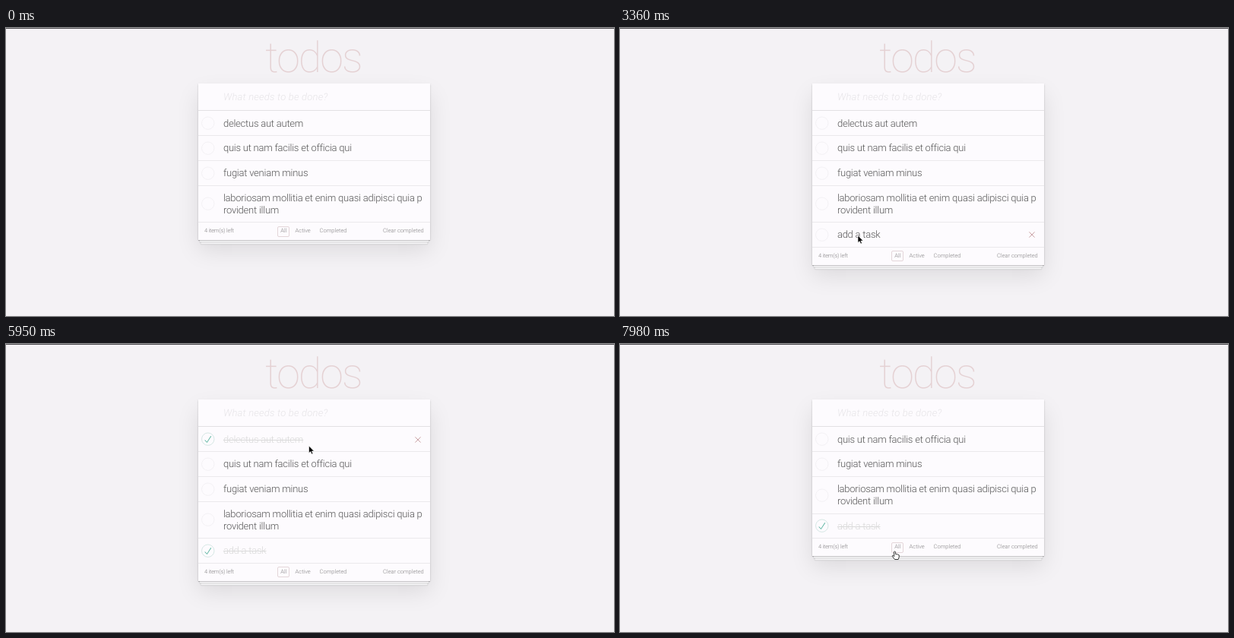
An HTML page that plays this animation: 800 px wide and 379 px high, repeating every 8 s.

```html
<!DOCTYPE html>
<html lang="en">
<head>
<meta charset="utf-8">
<title>todos</title>
<style>
  html, body { margin: 0; width: 100%; height: 100%; overflow: hidden; }
  body {
    position: relative; background: #f4f2f5;
    font: 300 13px/16px Roboto, "Liberation Sans", sans-serif;
    letter-spacing: -.23px; text-rendering: geometricPrecision;
  }
  #edge { position: absolute; top: 0; left: 0; right: 0; height: 1px; background: #504e52; }
  h1 {
    position: absolute; left: 341px; top: 6px; margin: 0;
    font-size: 55.6px; font-weight: 100; line-height: 66px; letter-spacing: -1.9px;
    color: rgba(160, 60, 60, .18);
  }
  #card {
    position: absolute; left: 252.6px; top: 72.6px; width: 305.5px; background: #fdfbfe;
    box-shadow: 0 1.1px 2.2px rgba(0, 0, 0, .2), 0 14px 28px rgba(0, 0, 0, .1);
  }
  #entry, .row { position: relative; box-sizing: border-box; padding-left: 33.3px; white-space: pre; }
  #entry { height: 36.9px; padding-top: 11px; border-bottom: 1px solid #e2e0e3; color: #575557; }
  #entry.empty { font-style: italic; letter-spacing: .22px; color: #e6e4e7; }
  #caret { display: inline-block; width: 1px; height: 15px; margin-right: -1px; vertical-align: -3px; background: #4d4d4d; }
  .row { padding-top: 9.2px; border-bottom: 1px solid #ebe9ec; }
  svg { position: absolute; overflow: visible; fill: none; }
  .toggle { left: 0; top: calc(50% - 11.1px); width: 22.2px; height: 22.2px; }
  .toggle circle { stroke: #e9e7ea; stroke-width: 3; }
  .toggle path { fill: #55b29d; visibility: hidden; }
  .done .toggle circle { stroke: #add2ca; }
  .done .toggle path { visibility: visible; }
  .done span { text-decoration: line-through; }
  .remove { right: 12.5px; top: calc(50% - 3.6px); width: 8px; height: 8px; stroke-width: .9; }
  footer {
    position: relative; height: 23px; font-size: 7.5px; line-height: 22.6px; letter-spacing: 0; color: #828082;
    box-shadow: 0 .6px .6px rgba(0, 0, 0, .2),
      0 4.4px 0 -1.7px #f6f5f7, 0 5px .6px -1.7px rgba(0, 0, 0, .25),
      0 8.9px 0 -3.3px #f6f5f7, 0 9.4px 1px -3.3px rgba(0, 0, 0, .25);
  }
  footer * { position: absolute; top: 0; white-space: nowrap; }
  footer i { left: 104.9px; top: 4.5px; width: 14px; height: 12px; border: 1px solid #e4d6d9; border-radius: 2px; }
  #cursor { left: 0; top: 0; width: 1px; height: 1px; }
</style>
</head>
<body>
<div id="edge"></div>
<h1>todos</h1>
<div id="card">
  <div id="entry"></div>
  <div id="list"></div>
  <footer>
    <span style="left:8.3px;letter-spacing:-.2px">4 item(s) left</span>
    <i></i>
    <span style="left:108.7px">All</span>
    <span style="left:128px">Active</span>
    <span style="left:160px">Completed</span>
    <span style="right:8.3px">Clear completed</span>
  </footer>
</div>
<svg id="cursor">
  <path id="arrow" fill="#000" stroke="#fff" stroke-width=".6" d="M0 0V9.6L2.2 7.6 3.8 11 5.4 10.3 3.9 7.1H6.9Z"/>
  <path id="beam" stroke="#333" stroke-width=".9" d="M-2.5-7.5Q0-7.5 0-6V6Q0 7.5-2.5 7.5M2.5-7.5Q0-7.5 0-6V6Q0 7.5 2.5 7.5"/>
  <path id="hand" fill="#fff" stroke="#222" stroke-width=".9" stroke-linejoin="round"
    d="M-1 1Q0-.2 1 1L1.2 4.2 2.8 4.1 4.3 4.6 5.8 5.4 5.6 8.4 4.6 11H0L-3.4 6.6Q-3.2 5.4-1.9 6.1L-.8 7.1Z"/>
</svg>
<script>
const LOOP = 8000, TICK = 70;
const FOCUS = 350, TYPE = 840, KEY = 140, SUBMIT = 2660, BLUR = 3990;
const LINE = 16, LIST_TOP = 109.5;
const $ = id => document.getElementById(id);
const clamp = k => Math.min(1, Math.max(0, k));
const smooth = k => k * k * (3 - 2 * k);

const newTask = 'add a task';
const tasks = [
  { text: 'delectus aut autem', doneAt: 5530, until: 7210 },
  { text: 'quis ut nam facilis et officia qui' },
  { text: 'fugiat veniam minus' },
  { text: 'laboriosam mollitia et enim quasi adipisci quia p\nrovident illum' },
  { text: newTask, from: SUBMIT, doneAt: 4130 },
].map(task => ({ from: 0, until: Infinity, doneAt: Infinity, ...task }));

for (const task of tasks) {
  const el = task.el = document.createElement('div');
  task.height = 16.7 + LINE * task.text.split('\n').length;
  el.className = 'row';
  el.style.height = task.height + 'px';
  el.innerHTML = '<svg class="toggle" viewBox="-10 -18 100 135"><circle cx="50" cy="50" r="50"/>'
    + '<path d="M72 25L42 71 27 56l-4 4 20 20 34-52z"/></svg>'
    + `<span>${task.text}</span>`
    + '<svg class="remove"><path d="M.4.4 7.6 7.6M7.6.4.4 7.6"/></svg>';
  $('list').append(el);
}

// Pointer gestures, each easing on from where the last one ended
const moves = [
  { start: 70, end: FOCUS, to: [392, 90] },
  { start: 2800, end: 3080, to: [264, 185] },
  { start: 3080, end: 3360, to: [313, 273] },
  { start: 3640, end: BLUR, to: [268, 274] },
  { start: 4410, end: 5250, to: [264, 125.5] },
  { start: 5530, end: 5740, to: [310, 195] },
  { start: 5740, end: 5950, to: [398.5, 134] },
  { start: 6020, end: 6510, to: [540.5, 126.5] },
  { start: 7420, end: 7840, to: [362, 284] },
  { start: 7840, end: 7980, to: [361.5, 272.5] },
];

function pointerAt(t) {
  const hidden = t < moves[0].start || t >= TYPE && t < 2870;
  if (hidden) return [-99, -99];
  return moves.reduce((from, { start, end, to }) => {
    const k = smooth(clamp((t - start) / (end - start)));
    return from.map((v, i) => v + (to[i] - v) * k);
  }, [392, 178]);
}

function drawEntry(t) {
  const count = Math.min(newTask.length, Math.max(0, Math.floor((t - TYPE) / KEY) + 1));
  const typed = t < SUBMIT ? newTask.slice(0, count) : '';
  const lastAction = t >= SUBMIT ? SUBMIT : count ? TYPE + (count - 1) * KEY : FOCUS;
  const blinkOn = t >= FOCUS && t < BLUR && (t - lastAction) % 1000 < 350;
  const caret = blinkOn ? '<b id="caret"></b>' : '';
  $('entry').className = typed ? '' : 'empty';
  $('entry').innerHTML = typed ? typed + caret : caret + 'What needs to be done?';
}

function drawTasks(t, [x, y]) {
  let top = LIST_TOP;
  for (const { el, from, until, doneAt, height } of tasks) {
    const shown = t >= from && t < until;
    el.style.display = shown ? '' : 'none';
    if (!shown) continue;
    const grey = 86 + 131 * clamp((t - doneAt + TICK) / 210);
    el.classList.toggle('done', t >= doneAt);
    el.style.color = `rgb(${grey},${grey},${grey})`;
    const hover = y >= top && y < top + height && x > 252 && x < 558;
    const remove = el.lastChild.style;
    remove.visibility = hover ? 'visible' : 'hidden';
    remove.stroke = x > 531 ? '#af5b5e' : '#c4989c';
    top += height;
  }
  return top;
}

function drawPointer([x, y], footerTop) {
  const overAll = x > 357 && x < 374 && y > footerTop + 4 && y < footerTop + 18;
  const shape = y < LIST_TOP ? 'beam' : overAll ? 'hand' : 'arrow';
  for (const id of ['arrow', 'beam', 'hand']) $(id).style.display = id === shape ? '' : 'none';
  $('cursor').style.transform = `translate(${x}px, ${y}px)`;
}

function frame(now) {
  const t = Math.floor(now % LOOP / TICK) * TICK;
  const pointer = pointerAt(t);
  drawEntry(t);
  drawPointer(pointer, drawTasks(t, pointer));
  requestAnimationFrame(frame);
}
frame(performance.now());
</script>
</body>
</html>
```
